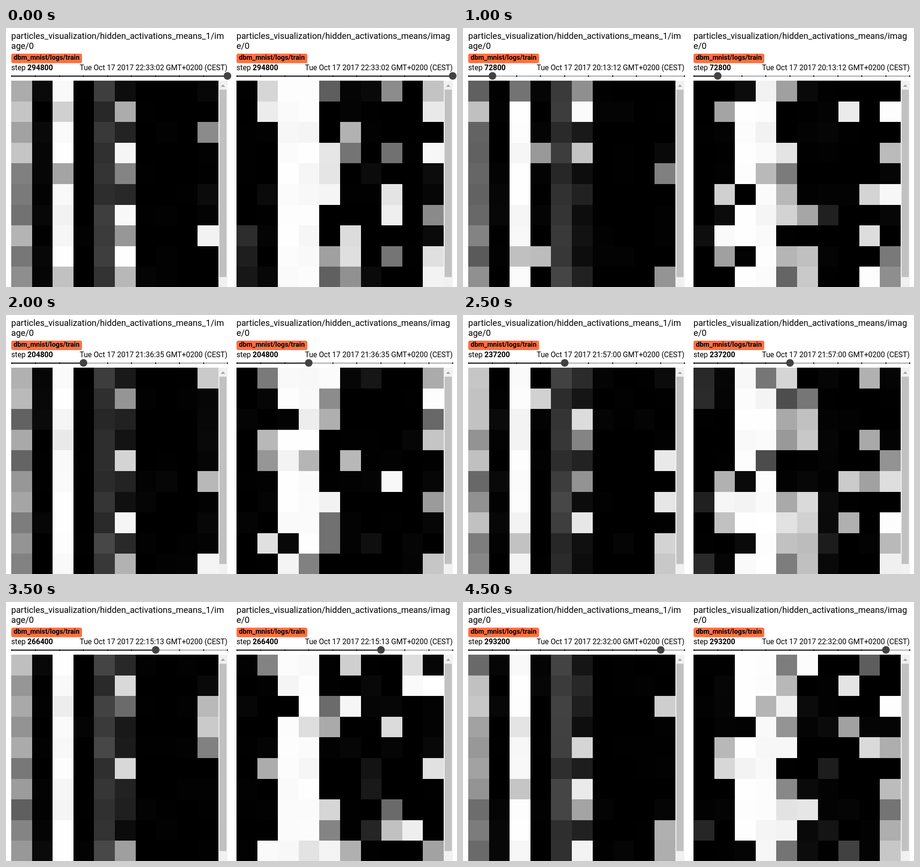
An HTML page with a canvas that plays this animation: 949x546 px, repeating every 5000 ms.

```html
<!DOCTYPE html>
<html lang="en">
<head>
<meta charset="utf-8">
<title>Hidden activations</title>
<style>
html, body { margin: 0; width: 100%; height: 100%; overflow: hidden; background: #fff; }
canvas { display: block; }
</style>
</head>
<body>
<canvas id="stage" width="949" height="546"></canvas>
<script>
const ctx = document.getElementById('stage').getContext('2d');
const HOLD = 500, CELL = 43.6, TOP = 111, WIDTH = 455;
const FONT = 'Roboto, sans-serif';

const steps = [
  [400, '19:27:31'], [72800, '20:13:12'], [128000, '20:48:02'],
  [204800, '21:36:35'], [237200, '21:57:00'], [252000, '22:06:14'],
  [266400, '22:15:13'], [280000, '22:23:44'], [293200, '22:32:00'],
  [294800, '22:33:02']
];

// Column rules: each takes a random source and returns a grey level
const black = rnd => 6 * rnd() ** 6;
const dark = rnd => 12 * rnd() ** 3;
const dim = rnd => 38 + 36 * rnd();
const grey = rnd => 90 + 110 * rnd();
const white = rnd => 254 - 12 * rnd() ** 2;
const lit = rnd => 60 + 195 * Math.sqrt(rnd());
const shade = rnd => 10 + 35 * rnd();
const mix = (usual, stray, odds) => rnd => (rnd() < odds ? stray : usual)(rnd);

const panels = [
  {
    x: 11,
    title: ['particles_visualization/hidden_activations_means_1/im', 'age/0'],
    columns: [grey, dark, mix(white, lit, 0.1), mix(black, lit, 0.08), dim,
      mix(shade, lit, 0.4), black, black, black, mix(dark, lit, 0.25)]
  },
  {
    x: 485,
    title: ['particles_visualization/hidden_activations_means/imag', 'e/0'],
    columns: [mix(black, shade, 0.15), mix(dark, lit, 0.2), mix(white, dark, 0.2),
      mix(white, lit, 0.25), mix(lit, black, 0.3), mix(dark, lit, 0.25),
      mix(dark, shade, 0.25), mix(black, lit, 0.15), mix(black, lit, 0.2),
      mix(dark, lit, 0.5)]
  }
];

function random(seed) {
  return () => {
    seed = (seed + 0x6D2B79F5) | 0;
    let n = Math.imul(seed ^ (seed >>> 15), seed | 1);
    n ^= n + Math.imul(n ^ (n >>> 7), n | 61);
    return ((n ^ (n >>> 14)) >>> 0) / 4294967296;
  };
}

function rect(x, y, w, h, color) {
  ctx.fillStyle = color;
  ctx.fillRect(x, y, w, h);
}

function text(str, x, y, size, weight = 400, align = 'left') {
  ctx.font = `${weight} ${size}px ${FONT}`;
  ctx.textAlign = align;
  ctx.fillStyle = '#000';
  ctx.fillText(str, x, y);
}

function drawHeader(x, title, pos) {
  const [step, time] = steps[pos];
  title.forEach((line, i) => text(line, x, 23 + 21 * i, 18.2));
  ctx.fillStyle = '#ff7043';
  ctx.beginPath();
  ctx.roundRect(x, 54, 149, 20, 4);
  ctx.fill();
  text('dbm_mnist/logs/train', x + 5, 67, 14.3, 700);
  text('step ', x, 89, 15.6);
  const indent = ctx.measureText('step ').width;
  text(String(step), x + indent, 89, 15.6, 700);
  text(`Tue Oct 17 2017 ${time} GMT+0200 (CEST)`, x + WIDTH, 89, 15.6, 400, 'right');
}

function drawSlider(x, pos) {
  const at = i => Math.round(x + 0.9 + 50.46 * i);
  rect(x, 100, WIDTH, 3, '#bdbdbd');
  rect(x, 100, at(pos) - x, 3, '#424242');
  for (let i = 0; i < 10; i++) rect(at(i) - 1, 100, 2, 3, '#000');
  ctx.fillStyle = '#424242';
  ctx.beginPath();
  ctx.arc(at(pos), 101, 8, 0, 2 * Math.PI);
  ctx.fill();
}

function drawGrid(x, columns, seed) {
  const rnd = random(seed);
  const edge = (start, i) => Math.round(start + i * CELL);
  columns.forEach((level, c) => {
    const left = edge(x, c), w = edge(x, c + 1) - left;
    for (let r = 0; r < 10; r++) {
      const v = Math.round(level(rnd)), top = edge(TOP, r);
      rect(left, top, w, edge(TOP, r + 1) - top, `rgb(${v},${v},${v})`);
    }
  });
}

function drawScrollbar(x) {
  rect(x, TOP, 19, 435, '#f1f1f1');
  rect(x + 2, 130, 15, 395, '#c1c1c1');
  ctx.fillStyle = '#a3a3a3';
  ctx.beginPath();
  ctx.moveTo(x + 5, 124);
  ctx.lineTo(x + 9.5, 119);
  ctx.lineTo(x + 14, 124);
  ctx.fill();
}

let shown = -1;
function frame() {
  // The loop opens on the last step, then runs from the first
  const pos = (Math.floor(performance.now() / HOLD) + 9) % 10;
  if (pos !== shown) {
    shown = pos;
    rect(0, 0, 949, 546, '#fff');
    panels.forEach(({ x, title, columns }, i) => {
      drawHeader(x, title, pos);
      drawSlider(x, pos);
      drawGrid(x, columns, pos * 7919 + i * 104729 + 17);
      drawScrollbar(x + 436);
    });
  }
  requestAnimationFrame(frame);
}
frame();
</script>
</body>
</html>
```
